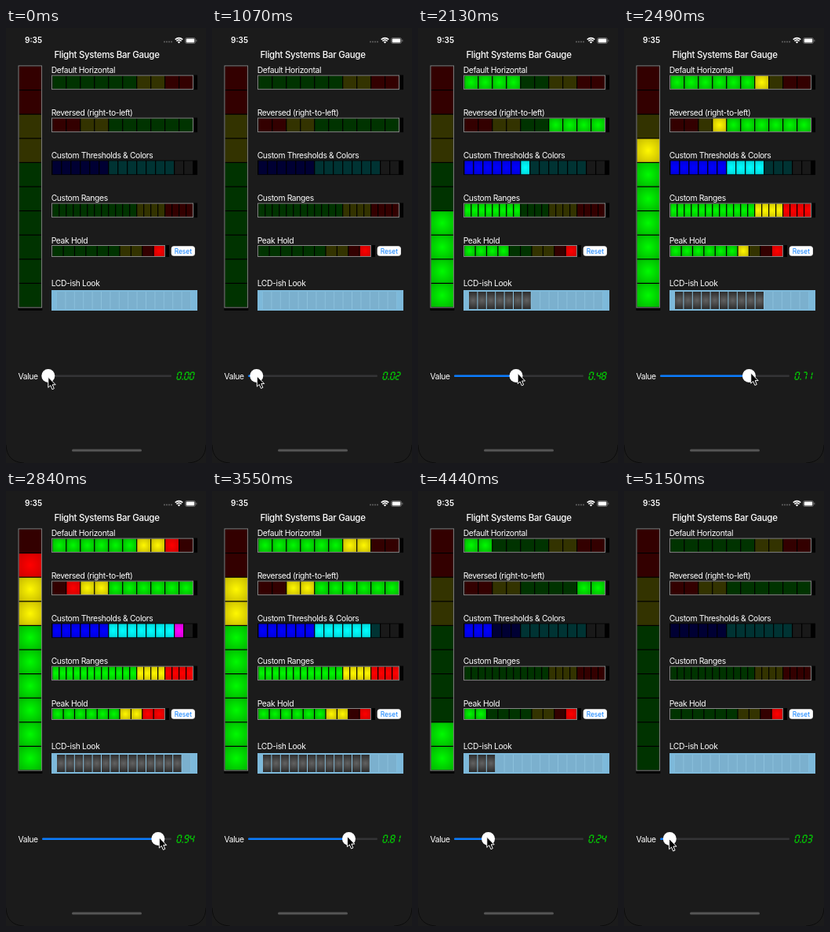
Write an HTML page that moves like this. It is 255 px wide and 551 px high and loops after 5.33 s.

```html
<!DOCTYPE html>
<html lang="en">
<head>
<meta charset="utf-8">
<title>Bar gauges</title>
<style>
  html, body { margin: 0; width: 100%; height: 100%; overflow: hidden; background: #1b1b1b; }
  svg { display: block; width: 255px; height: 551px; }
  text { font-family: Inter, "Open Sans", sans-serif; font-size: 10.3px; letter-spacing: -.034em; fill: #fff; }
</style>
</head>
<body>
<svg id="stage" viewBox="0 0 255 551"></svg>
<script>
const stage = document.getElementById('stage');

function el(name, attrs, parent = stage, text) {
  const node = document.createElementNS('http://www.w3.org/2000/svg', name);
  for (const key in attrs) node.setAttribute(key, attrs[key]);
  if (text) node.textContent = text;
  parent.append(node);
  return node;
}
const rect = (x, y, width, height, fill, extra) =>
  el('rect', { x, y, width, height, fill, ...extra });
const border = (x, y, w, h) =>
  rect(x + .5, y + .5, w - 1, h - 1, 'none', { stroke: '#858585' });
const label = (x, y, text, style = '') => el('text', { x, y, style }, stage, text);

// Segment colours: [unlit, lit centre, lit edge]
const COLORS = {
  green: ['#003300', '#00fa00', '#00b800'],
  yellow: ['#333300', '#fff800', '#c8bc00'],
  red: ['#330000', '#ff0000', '#d00000'],
  blue: ['#000033', '#0000ff', '#0000d4'],
  cyan: ['#003333', '#00ffff', '#00d0d4'],
  magenta: ['#191919', '#ff00ff', '#d000d0'],
  lcd: ['#7bb0ce', '#626262', '#1d1d1d']
};
const defs = el('defs', {});

// A circular glow for segments of the given size; returns its paint.
function glow(name, w, h) {
  const id = `${name}-${Math.round(w)}-${Math.round(h)}`;
  if (!document.getElementById(id)) {
    const radius = Math.max(w, h) * .65;
    const [, centre, edge] = COLORS[name];
    const gradient = el('radialGradient', {
      id, cx: 0, cy: 0, r: 1,
      gradientTransform: `translate(.5 .5) scale(${radius / w} ${radius / h})`
    }, defs);
    el('stop', { offset: 0, 'stop-color': centre }, gradient);
    el('stop', { offset: 1, 'stop-color': edge }, gradient);
  }
  return `url(#${id})`;
}

const standard = p => p < .6 ? 'green' : p < .8 ? 'yellow' : 'red';
const custom = p => p < .4 ? 'blue' : p < .86 ? 'cyan' : 'magenta';
const lcd = () => 'lcd';

// Builds a gauge and returns a function that lights it for a value.
function gauge({ x, y, w, h, n = 10, color = standard, vertical, reverse, lo = 0, hi = 1, hold, gap = 1.2 }) {
  const step = (vertical ? h : w) / n;
  const cellW = vertical ? w : step - gap;
  const cellH = vertical ? step - gap : h;
  const cells = Array.from({ length: n }, (_, i) => {
    const name = color((i + .01) / n);
    const start = (vertical || reverse ? n - 1 - i : i) * step + gap / 2;
    const node = rect(vertical ? x : x + start, vertical ? y + start : y, cellW, cellH);
    return { node, off: COLORS[name][0], on: glow(name, cellW, cellH) };
  });
  return value => {
    const level = Math.floor((value - lo) / (hi - lo) * n + 1e-6);
    cells.forEach(({ node, on, off }, i) =>
      node.setAttribute('fill', i < level || (hold && i === n - 1) ? on : off));
  };
}

// Screen and status bar
el('path', { d: 'M0 528Q1 550 23 551M232 551Q254 550 255 528', fill: 'none', stroke: '#0c0c0c' });
label(24, 19.4, '9:35', 'font-size:10px;font-weight:600;letter-spacing:0');
for (let i = 0; i < 4; i++) el('circle', { cx: 202 + i * 3, cy: 17.6, r: 1, fill: '#656565' });
el('path', {
  d: 'M215.7 14.6Q220.5 10.6 225.3 14.6M217.3 16.5Q220.5 13.8 223.7 16.5',
  fill: 'none', stroke: '#fff', 'stroke-width': 1.5
});
el('path', { d: 'M218.7 17.7Q220.5 16.5 222.3 17.7L220.5 19.6Z', fill: '#fff' });
rect(228.5, 12.5, 13, 7, 'none', { rx: 2, stroke: '#777', 'stroke-width': .8 });
rect(229.7, 13.6, 10.6, 4.8, '#fff', { rx: 1 });
rect(242.4, 14.7, .9, 2.6, '#777');

label(128.5, 38.1, 'Flight Systems Bar Gauge', 'font-size:11.5px;font-weight:500;text-anchor:middle;letter-spacing:-.026em');

// Gauges
const ROW = 54;
['Default Horizontal', 'Reversed (right-to-left)', 'Custom Thresholds & Colors',
  'Custom Ranges', 'Peak Hold', 'LCD-ish Look'].forEach((text, i) => label(57.7, 56.8 + ROW * i, text));

rect(15.5, 47.5, 30.8, 310.3, '#000');
const gauges = [gauge({ x: 16.5, y: 48, w: 28.8, h: 306, vertical: true })];
border(15.5, 47.4, 30.6, 307.2);

[{}, { reverse: true }, { n: 15, color: custom }, { n: 20, lo: .3, hi: .7 }].forEach((options, i) => {
  const y = 59.6 + ROW * i;
  rect(58, y, 186, 18.5, '#000');
  gauges.push(gauge({ x: 58.8, y: y + .8, w: 179.8, h: 16.9, ...options }));
  if (options.color !== custom) border(58, y, 181, 18.5);
});

rect(58, 275, 150, 15, '#000');
gauges.push(gauge({ x: 58.7, y: 276, w: 143.8, h: 13, hold: true }));
border(58, 275, 145, 15);

rect(58, 332, 186, 26, '#7db9da');
rect(64.5, 334, 171, 22, '#8bc0dc');
gauges.push(gauge({ x: 64.5, y: 334, w: 171, h: 22, n: 15, color: lcd, gap: 1 }));

rect(210.7, 276.3, 30.2, 12.5, '#fff', { rx: 3.5 });
label(225.8, 285.6, 'Reset', 'font-size:8.4px;fill:#007aff;text-anchor:middle;letter-spacing:0');

// Slider
label(15.5, 444.6, 'Value');
const track = { x: 46, y: 439.5, height: 2.4, rx: 1.2 };
el('rect', { ...track, width: 165, fill: '#343436' });
const fill = el('rect', { ...track, fill: '#0a7cff' });
const thumb = el('circle', { cy: 440.6, r: 8.5, fill: '#fff' });

// Slanted seven-segment readout
const BARS = {
  a: 'M.5 0H4', b: 'M4.5 .5V4', c: 'M4.5 5V8.5', d: 'M.5 9H4',
  e: 'M0 5V8.5', f: 'M0 .5V4', g: 'M.5 4.5H4'
};
const DIGITS = 'abcdef bc abged abgcd fgbc afgcd afgedc abc abcdefg abcdfg'.split(' ');
const readout = [217.7, 227.2, 234].map(x =>
  el('path', { transform: `translate(${x + 1.8} 436) skewX(-11)`, fill: 'none', stroke: '#00dc00', 'stroke-width': 1.25 }));
rect(224.4, 444.2, 1.4, 1.4, '#00dc00');

rect(84, 533.5, 89, 3, '#555', { rx: 1.5 });

const pointer = el('path', {
  d: 'M0 0V13.2L3 10.5L5.1 15.5L7.5 14.5L5.4 9.6H9.4Z',
  fill: '#000', stroke: '#fff', 'stroke-width': 1
});

// The drag advances in even steps; key points are [step, value].
const LOOP = 5330, STEPS = 30;
const KEYS = [[0, 0], [5, 0], [6, .02], [8, .09], [12, .478], [16, .94], [18, 1],
  [20, .81], [25, .24], [27, .114], [29, .03], [30, 0]];

function valueAt(step) {
  const s = Math.max(0, Math.min(STEPS, step));
  const next = Math.max(1, KEYS.findIndex(key => key[0] >= s));
  const [s0, v0] = KEYS[next - 1], [s1, v1] = KEYS[next];
  return v0 + (v1 - v0) * (s - s0) / (s1 - s0);
}

function draw(time) {
  const step = Math.min(STEPS - 1, Math.floor((time % LOOP + 3) / LOOP * STEPS));
  const value = valueAt(step);
  const x = 53.8 + 149 * value;
  const speed = (valueAt(step + 1) - valueAt(step - 1)) / 2;
  gauges.forEach(light => light(value));
  fill.setAttribute('width', x - track.x);
  thumb.setAttribute('cx', x);
  // The pointer leads the thumb and lifts a little as it moves faster.
  pointer.setAttribute('transform', `translate(${x + 20 * speed} ${442.2 - 45 * Math.abs(speed)})`);
  [...value.toFixed(2).replace('.', '')].forEach((digit, i) =>
    readout[i].setAttribute('d', [...DIGITS[digit]].map(bar => BARS[bar]).join('')));
}

const start = performance.now();
function tick() {
  draw(performance.now() - start);
  requestAnimationFrame(tick);
}
tick();
</script>
</body>
</html>
```
